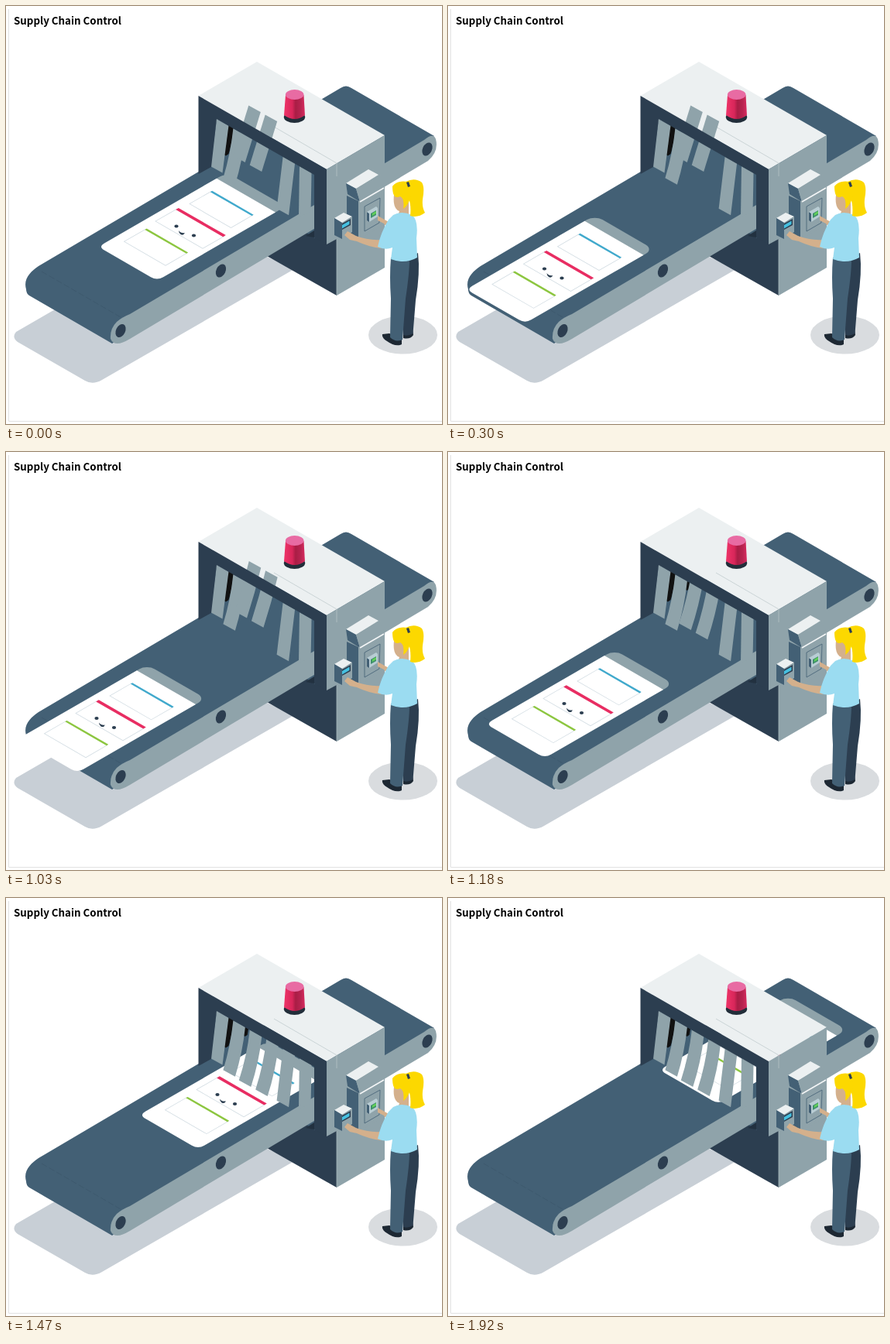
Animation of 563x540 px, one loop 2.82 s. Source, as an HTML page:

```html
<!DOCTYPE html>
<html lang="en">
<head>
<meta charset="utf-8">
<title>Supply Chain Control</title>
<style>
html, body { margin: 0; width: 100%; height: 100%; overflow: hidden; background: #fff; }
svg { display: block; width: 563px; height: 540px; }
text { font: bold 13.33px "Noto Sans CJK JP", "Noto Sans CJK SC", "Noto Sans", sans-serif; }
.steel { fill: #8fa3aa; }
.blue { fill: #436075; }
.navy { fill: #2c3e50; }
.pale { fill: #ecf0f1; }
.skin { fill: #d4b08c; }
.hair { fill: #fcd800; }
.shoe { fill: #1d2833; }
</style>
</head>
<body>
<svg viewBox="0 0 563 540">
  <linearGradient id="glow">
    <stop offset="0" stop-color="#ee3468"/>
    <stop offset=".4" stop-color="#d8265a"/>
    <stop offset=".55" stop-color="#a91d45"/>
    <stop offset=".8" stop-color="#b82450"/>
    <stop offset="1" stop-color="#d92b60"/>
  </linearGradient>
  <path d="M3.5 4V536.5H563" fill="none" stroke="#e2e2e2"/>
  <text x="10" y="23.7">Supply Chain Control</text>

  <!-- ground shadow, lower cabinet -->
  <path fill="#c8cfd6" d="M13 421L250 284L372 340L124 483Q112 490 102 484L15 434Q7 428 13 421Z"/>
  <path class="navy" d="M337 323L427 374V300L398 270Z"/>
  <path class="blue" d="M272 146L414 218L399 300L262 212Z"/>
  <path d="M287 152L294 157Q292 178 286 196L282 192Z M307 166L313 169L311 181L306 177Z" fill="#111"/>

  <!-- conveyor -->
  <path class="blue" d="M26 366C22 352 32 343 42 336L432 106Q439 101 446 106L553 168L160 420L137 436L30 374Q26 371 26 366Z"/>
  <path d="M46 343L148 402" stroke="#3b566a" stroke-width=".7" stroke-dasharray="8 3"/>
  <path class="steel" d="M135 430Q134 417 143 408Q150 402 160 398L540 173Q552 163 555 172Q559 188 545 200L160 430Q140 442 135 430Z"/>
  <g id="holes" class="navy"></g>

  <!-- printed sheet, laid out in belt axes -->
  <g id="sheet">
    <g transform="matrix(1 -.577 1 .577 0 0)">
      <rect class="steel" x="-100" y="329" width="56" height="76" rx="10"/>
      <path fill="#fff" d="M-57 329H-202q-8 0 -8 8v60q0 8 8 8H-57Z"/>
      <g id="boxes"></g>
    </g>
    <g class="navy">
      <ellipse cx="220" cy="284.5" rx="2.6" ry="2"/>
      <ellipse cx="242.500" cy="296.500" rx="2.600" ry="2"/>
      <path d="M223 290Q226 294 231 293Q229 297 225.500 295Q223 293 223 290Z"/>
    </g>
  </g>

  <!-- machine shell; loose strips pass behind the front frame -->
  <path class="pale" d="M248.500 116L324 72L489 167L414 211Z"/>
  <path d="M346 156L427 203" stroke="#bcc7cb" stroke-width=".7"/>
  <g id="strips" class="steel"></g>
  <path class="navy" d="M248.500 116L414 211V308L398 299V218L272 146L265 208L248.500 217Z"/>
  <path fill="#223140" d="M387 297L398 290V299Z"/>
  <path class="steel" d="M414 211L489 167V338L427 374V301L414 308Z"/>
  <path d="M427 301V374" stroke="#a9b8bd" stroke-width=".8"/>
  <path d="M427 203V220" stroke="#bcc7cb" stroke-width=".7"/>

  <!-- lamp -->
  <ellipse cx="372.500" cy="143.500" rx="13.700" ry="7.500" fill="#222e3a"/>
  <path fill="url(#glow)" d="M361 115H384.500L386 141Q373 151 359 141Z"/>
  <ellipse cx="372.700" cy="114.500" rx="11.800" ry="6.500" fill="#e86ba3"/>

  <!-- control boxes -->
  <path class="pale" d="M439 229L468 211L481 218L452 236Z"/>
  <path class="blue" d="M439 229L452 236L457 253L441 243Z M440 245L455 252V301L440 291Z"/>
  <path class="steel" d="M452 236L481 219L489 232L457 253Z M455 252L489 233V283L455 302Z"/>
  <path d="M457 253L488 235" stroke="#f4f6f7" stroke-width="1.500"/>
  <path d="M463 259L483 248L482 280L463 291Z" fill="none" stroke="#436075" stroke-width=".8"/>
  <path class="blue" d="M466 266L469 268V279L466 277Z"/>
  <path fill="#b9cdd4" d="M466 266L478 259L480 261V272L469 279V268Z"/>
  <path fill="#3f8f6b" d="M471 268L478 264V270L471 274Z"/>
  <path fill="#62cf58" d="M473 268L478 265V268L473 271Z"/>
  <path class="pale" d="M424 274L436 267L447 272L434 280Z"/>
  <path class="blue" d="M424 274L434 280V301L424 296Z"/>
  <path class="steel" d="M434 280L447 272V292L434 301Z"/>
  <path class="navy" d="M434 281L445 275V283L434 289Z"/>
  <path fill="#45c0e0" d="M434 283L443.500 277.500V282L434 287.500Z"/>

  <!-- operator -->
  <ellipse cx="512.500" cy="425" rx="44.500" ry="24.500" fill="#d9dcdf"/>
  <path class="shoe" d="M486 424Q485 429 492 433Q503 441 511 437V429L495 423Z M513 429Q522 431 526 425L525 418L513 421Z"/>
  <path class="navy" d="M513 328L532 319Q535 345 529 380L525.500 423Q519 427 513 425L512 380Z"/>
  <path class="blue" d="M497 325L521 327Q521 345 516 378L512 431Q503 435 496 428L497 378Q495 350 497 325Z"/>
  <path class="skin" d="M485 302Q467 303 452 297L441 291L437 296L444 302L453 304Q468 311 484 313Z M498 281L487 275L480 271V277L488 281L493 288Z M501 244Q499 262 508 265L506 271H520V248Z"/>
  <path fill="#9bdcf1" d="M500 270Q511 264 524 270Q533 276 530 300L531 325Q515 334 497 327L499 312Q490 316 480 311Q484 292 494 276Z"/>
  <path class="hair" d="M516 227Q528 221 537 228Q541 234 538 250Q537 260 541 267Q532 274 522 271Q524 255 517 238Z"/>
  <path class="hair" d="M499 233Q505 225 518 227L524 240Q521 257 513 262Q515 249 509 246Q499 251 499 233Z"/>
  <path class="navy" d="M517 228L520 227L522 233L519 234Z"/>
</svg>
<script>
const $ = id => document.getElementById(id);
const LOOP = 2820;
// start time, sheet offset along the belt, lift of the two loose strips
const steps = [
  [0, 0, 1], [150, -54, 1], [300, -95.5, 1], [440, -109, 1], [590, -110, 1], [1030, -103, .7],
  [1180, -70, .33], [1320, -15, 0], [1470, 53, 0], [1620, 110, 0], [1770, 144, 0], [1920, 154, 0]
];

$('holes').innerHTML = [[148, 419.5], [277.5, 342], [544, 185]].map(([x, y]) =>
  `<ellipse cx="${x}" cy="${y}" rx="6" ry="9" transform="rotate(25 ${x} ${y})"/>`).join('');

$('boxes').innerHTML = [
  [-75, 340, 53.5, 2.4, '#40a9cc'], [-116.5, 337.5, 61, 3.6, '#e82d62'], [-159.5, 340, 53.5, 2.4, '#8cc63f']
].map(([u, v, w, line, color]) =>
  `<rect x="${u - 28}" y="${v}" width="28" height="${w}" fill="none" stroke="#d3dde3" stroke-width=".8"/>
   <rect x="${u - line / 2}" y="${v}" width="${line}" height="${w}" fill="${color}"/>`).join('');

const lean = [-8, -13, -14, -14, -8, -1];
const height = [61, 64, 65, 65, 67, 66];

function strip(i, lift) {
  const x = 272 + 21.4 * i - 1.5 * lift, y = 146 + 12.2 * i - 42 * lift;
  const dx = lean[i] - 6 * lift, h = height[i];
  const curved = i > 0 && i < 4 ? 1 - lift : 0;
  const cx = dx * (.5 - .25 * curved), cy = h / 2;
  const end = i === 5 ? -7 : 8.5;
  return `M${x} ${y}l15.5 8.5q${cx} ${cy} ${dx} ${h + end - 8.5}l-15.5 ${-end}Q${x + cx} ${y + cy} ${x} ${y}Z`;
}

$('strips').innerHTML = '<path/>'.repeat(6);
const strips = [...$('strips').children];

function draw() {
  const t = performance.now() % LOOP;
  const [, dx, lift] = steps.findLast(s => s[0] <= t);
  $('sheet').setAttribute('transform', `translate(${dx} ${-.577 * dx})`);
  strips.forEach((p, i) => p.setAttribute('d', strip(i, i === 2 || i === 3 ? lift : 0)));
  requestAnimationFrame(draw);
}
draw();
</script>
</body>
</html>
```
